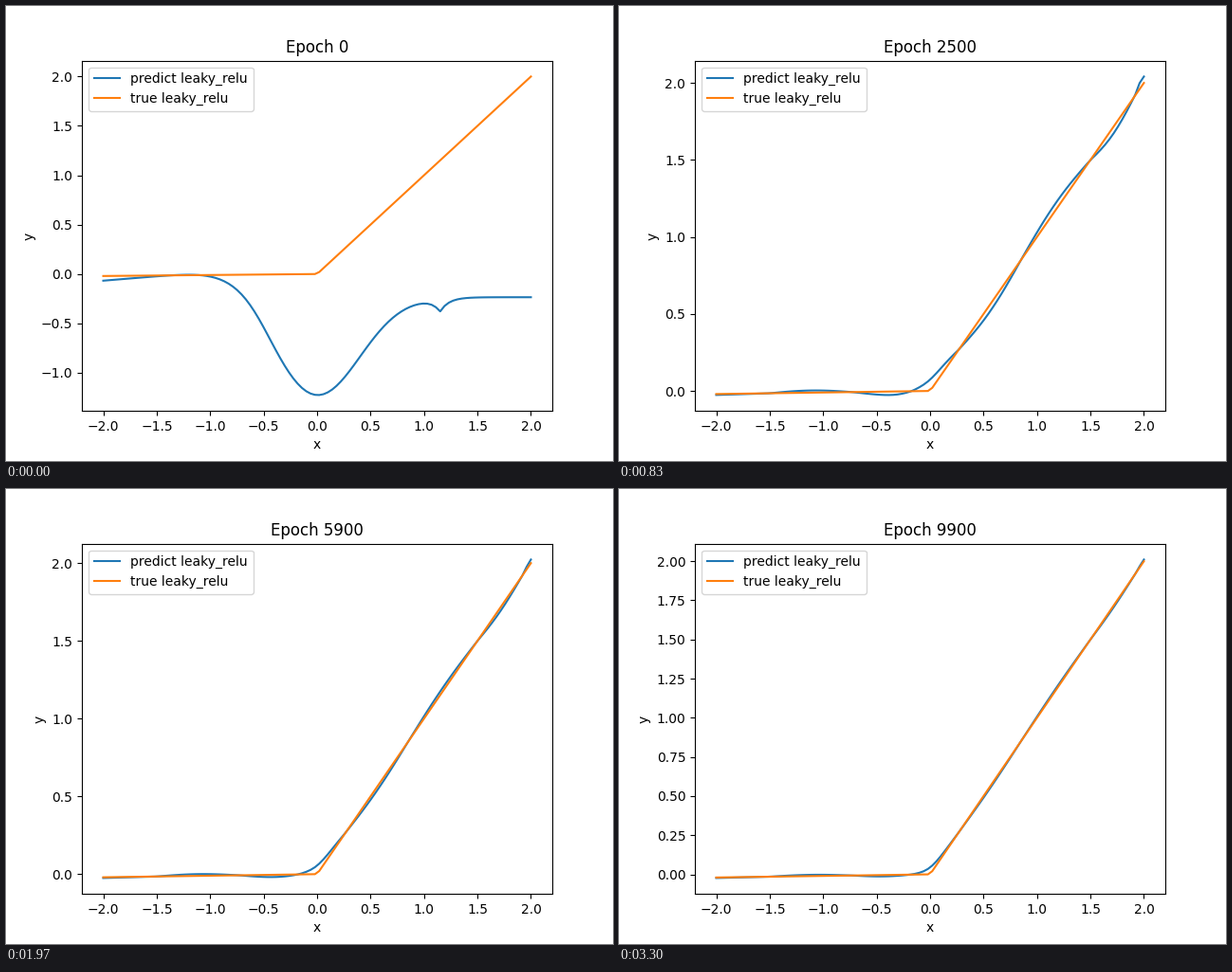
Recreate the animation shown at these times as a matplotlib script. Size 640 by 480 pixels, loop 3.33 s.

```python
import numpy as np
import matplotlib.pyplot as plt
from matplotlib.animation import FuncAnimation

# Slots are finer than the 33.3 ms per epoch step, so changes land on time.
SLOTS, SLOT_MS = 222, 15
EPOCH_STEP, STEPS = 100, 100
SETTLED = 500  # epoch at which the first rough shape is gone

EARLY_ZEROS = [-3, -1.47, -0.38, 0.53, 1.25, 2]
LATE_ZEROS = [-5, -1.5, -0.73, -0.17, 0.27, 0.85, 1.5, 1.92, 2.08]

xs = np.linspace(-2, 2, 100)
truth = np.where(xs > 0, xs, 0.01 * xs)


def rise(x, rate):
    """Smooth step from 0 to 1 around x = 0."""
    return 0.5 * (1 + np.tanh(rate * x))


def wave(zeros):
    """Unit ripple that changes sign at each zero, negative first."""
    return -np.sin(np.pi * np.interp(xs, zeros, range(len(zeros))))


def untrained():
    """One wide dip on a sloping floor, with a small cusp."""
    step = rise(xs + 0.5, 4)
    floor = 0.09 * (xs + 1.25) * (1 - step) - 0.235 * step
    dip = 0.997 * np.exp(-xs**2 / 0.32)
    cusp = 0.13 * np.exp(-np.abs(xs - 1.15) / 0.08)
    return floor - dip - cusp


def rounding(epoch):
    """Softened corner at x = 0, which sharpens with training."""
    s = 0.05 + 0.17 * np.exp(-epoch / 400)
    return s * np.log1p(np.exp(-np.abs(xs) / s))


def ripple(epoch):
    """Error waves: a coarse set gives way to a finer, shrinking one."""
    coarse = (0.14 + 0.05 * xs) * wave(EARLY_ZEROS)
    left = 0.016 * (1 - epoch / 20000)
    right = 0.072 * np.exp(-epoch / 5200)
    fine = (left + (right - left) * rise(xs + 0.3, 4)) * wave(LATE_ZEROS)
    mix = np.exp(-(epoch - SETTLED) / 300)
    return mix * coarse + (1 - mix) * fine


def spike(epoch):
    """Sharp peak that shrinks and slides out at the right edge."""
    height = 1.6 * np.exp(-epoch / 510)
    centre = 1.902 + 3.64e-5 * epoch
    d = xs - centre
    climb = height * np.exp(np.minimum(d, 0) / 0.09)
    return climb - 19.4 * np.sqrt(height) * np.maximum(d, 0)


def predict(epoch):
    e = max(epoch, SETTLED)
    fit = truth + rounding(e) + ripple(e) + spike(e)
    learned = min(np.log1p(epoch / 100) / np.log1p(SETTLED / 100), 1)
    return (1 - learned) * untrained() + learned * fit


fig, ax = plt.subplots(figsize=(6.4, 4.8), dpi=100)
line, = ax.plot(xs, predict(0), label="predict leaky_relu")
ax.plot(xs, truth, label="true leaky_relu")
ax.set_xlabel("x")
ax.set_ylabel("y")
ax.legend(loc="upper left")
title = ax.set_title("Epoch 0")


def update(slot):
    # Step reached just before the slot ends
    step = ((slot + 1) * STEPS - 1) // SLOTS
    epoch = step * EPOCH_STEP
    line.set_ydata(predict(epoch))
    title.set_text(f"Epoch {epoch}")
    ax.relim()
    ax.autoscale_view()
    return line, title


anim = FuncAnimation(fig, update, frames=SLOTS, interval=SLOT_MS,
                     repeat=True, repeat_delay=0, blit=False)
plt.show()
```
